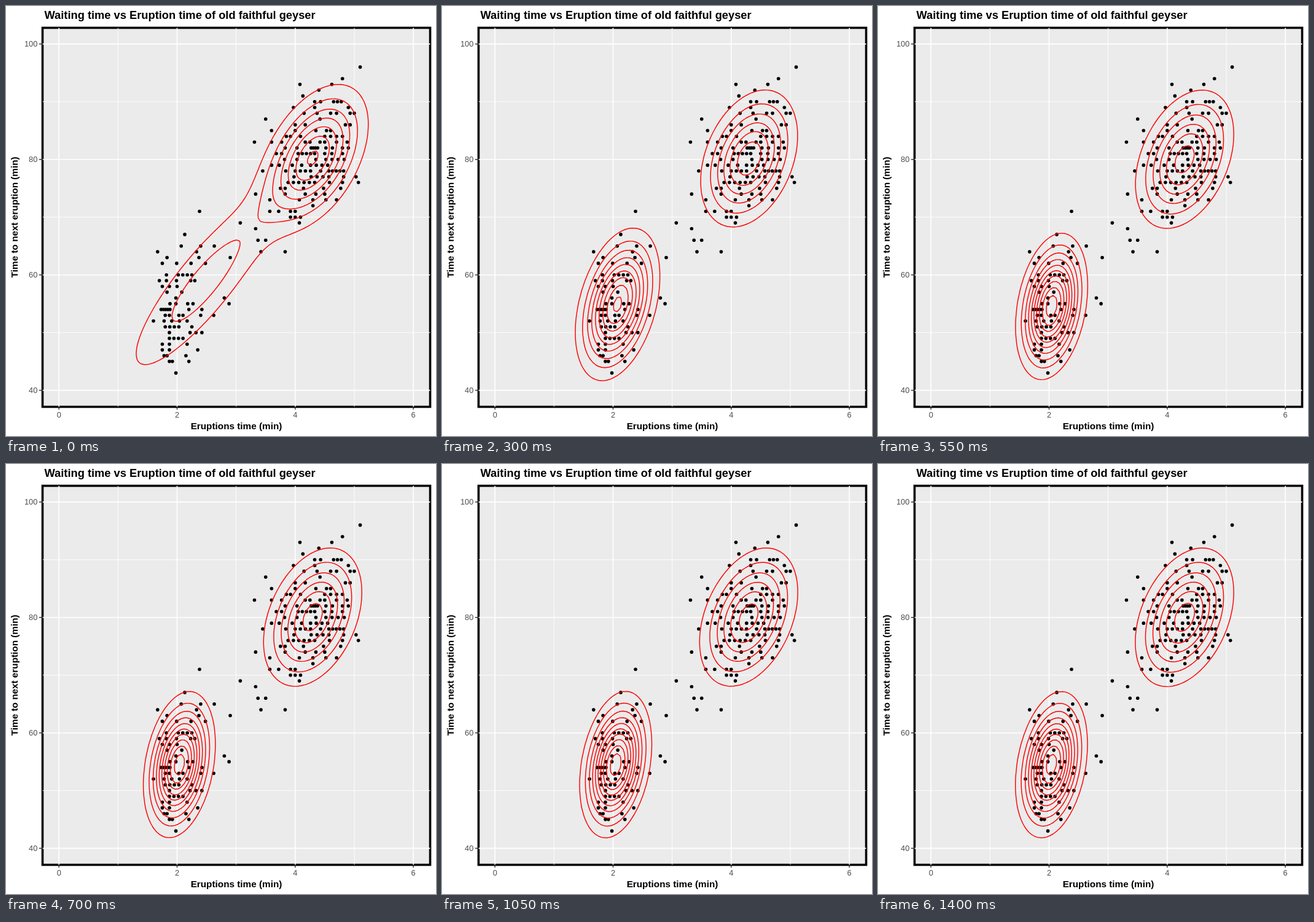
An HTML page for the animation above (1450 ms loop, 700 by 700 pixels).

```html
<!DOCTYPE html>
<html lang="en">
<head>
<meta charset="utf-8">
<title>Eruption mixture</title>
<style>
  html, body { margin: 0; width: 100%; height: 100%; overflow: hidden; background: #fff; }
  svg { display: block; width: 700px; height: 700px; font-family: "Liberation Sans", Arial, sans-serif; }
  .bold { font-weight: bold; font-size: 15.3px; text-anchor: middle; }
  .tick { font-size: 12.8px; fill: #4d4d4d; }
  #contours { fill: none; stroke: #f00; stroke-width: 1.45; stroke-linecap: round; }
</style>
</head>
<body>
<svg viewBox="0 0 700 700">
  <rect x="59.5" y="35.5" width="631" height="617" fill="#ebebeb" stroke="#000" stroke-width="3.6"/>
  <g id="grid"></g>
  <g id="dots"></g>
  <path id="contours"/>
  <text x="62.5" y="21" font-size="18.3" font-weight="bold">Waiting time vs Eruption time of old faithful geyser</text>
  <text class="bold" x="375" y="689">Eruptions time (min)</text>
  <text class="bold" transform="translate(19 343.8) rotate(-90)">Time to next eruption (min)</text>
</svg>
<script>
const FRAME = 50, FRAMES = 29;
const byId = id => document.getElementById(id);
const px = x => 86.2 + x * 96.15;
const py = y => 625.6 - (y - 40) * 9.396;

function add(parent, tag, attrs, text) {
  const el = document.createElementNS('http://www.w3.org/2000/svg', tag);
  for (const key in attrs) el.setAttribute(key, attrs[key]);
  if (text !== undefined) el.textContent = text;
  parent.appendChild(el);
}

// Grid, ticks and tick labels
const grid = byId('grid');
const line = (d, color, width) => add(grid, 'path', { d, stroke: color, 'stroke-width': width });
for (let i = 0; i < 7; i++) {
  const x = px(i), y = py(40 + i * 10), major = i % 2 === 0, w = major ? 1.6 : 0.9;
  line(`M${x} 35.5V652.5`, '#fff', w);
  line(`M59.5 ${y}H690.5`, '#fff', w);
  if (!major) continue;
  line(`M${x} 654.3V657`, '#333', 1.5);
  line(`M54 ${y}H57.7`, '#333', 1.5);
  add(grid, 'text', { class: 'tick', x, y: 670.3, 'text-anchor': 'middle' }, i);
  add(grid, 'text', { class: 'tick', x: 51.3, y: y + 4.6, 'text-anchor': 'end' }, 40 + i * 10);
}

// One row per waiting minute; eruption times in 1/100 min, [from, to, count] is an even run
const shortRows = [
  [198], [], [187, 192, 220], [178, 183, 215], [175, 187, 235], [175, 187, 217],
  [[187, 210, 4]], [187, [222, 242, 3]], [[180, 203, 4], 225], [160, [178, 217, 4]],
  [180, 187, 203, 210, 240, 262], [[173, 188, 5], 220, 242], [188, 198, 218, 227, 288],
  [198, 280], [183, 208], [175, 187, 200], [170, 182, 199, 223, 230],
  [182, [202, 225, 4]], [], [[175, 248, 4]], [183, 237, 290], [167, 233], [207, 240, 263],
  [], [213], [], [], [], [238]
];
const longRows = [
  [342, 383], [], [337, 350], [], [333], [307, 407], [392, 400, 409], [357, 372, 392, 400],
  [430], [357, 407, 430, 452, 470], [333, 383, 417, 435, 450], [375, 383, 414, 448, 477],
  [[388, 433, 6], 458, 480, 507], [398, [427, 457, 4], 482, 503],
  [345, 384, [400, 426, 4], 443, [457, 482, 5]], [360, 373, 395, 411, [426, 455, 4]],
  [382, 403, 435, [452, 483, 4]], [368, 377, [405, 433, 5], 450, 462, 480],
  [383, 403, [427, 438, 4], 452, 463, 480, 490], [331, 360, 377, 417, 425, [442, 450, 2], 470, 488],
  [385, 392, 409, [450, 480, 4]], [360, 400, 435, 453, 460], [400, 417, 485, 493], [350, 442],
  [415, 437, [460, 470, 2], 493, 500], [397, 433, 490], [433, 443, [465, 478, 3]],
  [413], [440], [408, 462], [480], [], [510]
];
function plot(rows, first) {
  rows.forEach((row, i) => row.forEach(item => {
    const [from, to, n] = Array.isArray(item) ? item : [item, item, 1];
    for (let k = 0; k < n; k++) {
      const x = from + (n > 1 ? (to - from) * k / (n - 1) : 0);
      add(byId('dots'), 'circle', { cx: px(x / 100), cy: py(first + i), r: 2.8 });
    }
  }));
}
plot(shortRows, 43);
plot(longRows, 64);

// Two normal components: centre x, y, sigma x, y, correlation, peak in contour steps
const start = [[323, 450, 83, 100, 0.868, 2.45], [501, 246, 45, 60, 0.45, 6.9]];
const middle = [[296, 475, 49.5, 71.1, 0.63, 5.32], [503, 244.5, 37.3, 53.5, 0.25, 7.53]];
const settled = [[282.5, 489.3, 27, 54.9, 0.28, 10.5], [499, 249.5, 41.4, 58.3, 0.36, 6.45]];

const mix = (a, b, u) => a.map((c, i) => c.map((v, j) => v + (b[i][j] - v) * u));
const noise = n => { const s = Math.sin(n * 12.9898) * 43758.5453; return (s - Math.floor(s)) * 2 - 1; };

function pose(i) {
  if (i < 4) return mix(start, middle, i / 4);
  if (i < 8) return mix(middle, settled, 1 - (1 - (i - 4) / 4) ** 2);
  return settled.map((c, k) => c.map((v, j) =>
    j < 2 ? v + 0.3 * noise(i * 7 + k * 3 + j) : j === 5 ? v + 0.07 * noise(i * 5 + k) : v));
}

function density(parts, x, y) {
  let sum = 0;
  for (const [cx, cy, sx, sy, r, peak] of parts) {
    const u = (x - cx) / sx, v = (cy - y) / sy;
    sum += peak * Math.exp(-(u * u - 2 * r * u * v + v * v) / (2 * (1 - r * r)));
  }
  return sum;
}

// Marching squares, all levels in one pass
const X0 = 190, Y0 = 110, CELL = 5, COLS = 84, ROWS = 102;
function contours(parts) {
  const z = [];
  for (let r = 0; r <= ROWS; r++) {
    z.push([]);
    for (let c = 0; c <= COLS; c++) z[r].push(density(parts, X0 + c * CELL, Y0 + r * CELL));
  }
  let d = '';
  for (let r = 0; r < ROWS; r++) for (let c = 0; c < COLS; c++) {
    const q = [[c, r], [c + 1, r], [c + 1, r + 1], [c, r + 1]];
    const h = q.map(([a, b]) => z[b][a]);
    const top = Math.max(...h);
    for (let level = Math.max(1, Math.ceil(Math.min(...h))); level < top; level++) {
      const hits = [];
      for (let e = 0; e < 4; e++) {
        const f = (e + 1) % 4;
        if ((h[e] < level) === (h[f] < level)) continue;
        const u = (level - h[e]) / (h[f] - h[e]);
        const x = X0 + CELL * (q[e][0] + (q[f][0] - q[e][0]) * u);
        const y = Y0 + CELL * (q[e][1] + (q[f][1] - q[e][1]) * u);
        hits.push(x.toFixed(2) + ' ' + y.toFixed(2));
      }
      for (let k = 0; k + 1 < hits.length; k += 2) d += `M${hits[k]}L${hits[k + 1]}`;
    }
  }
  return d;
}

const path = byId('contours');
let shown = -1;
function draw() {
  const i = Math.floor(performance.now() / FRAME) % FRAMES;
  if (i !== shown) path.setAttribute('d', contours(pose(shown = i)));
  requestAnimationFrame(draw);
}
draw();
</script>
</body>
</html>
```
